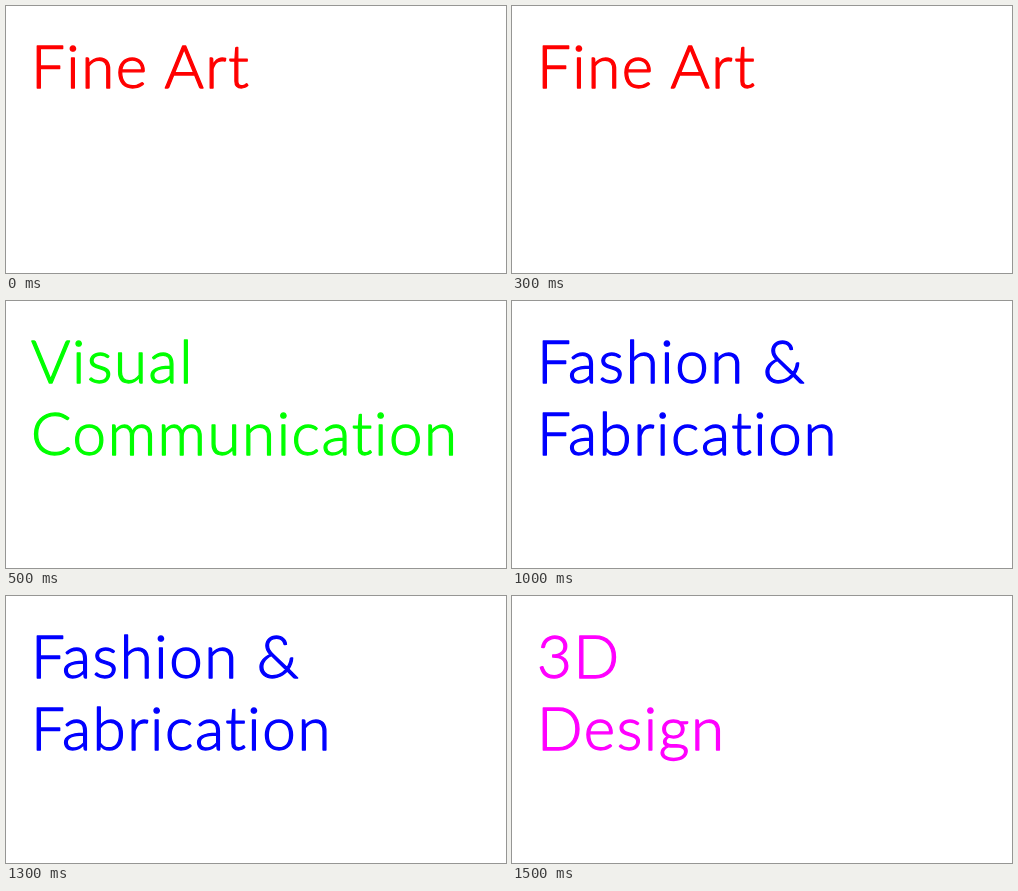
Write an HTML page that moves like this. It is 500 px wide and 267 px high and loops after 2 s.

```html
<!DOCTYPE html>
<html lang="en">
<head>
<meta charset="utf-8">
<title>Courses</title>
<style>
  html, body {
    margin: 0;
    width: 100%;
    height: 100%;
    overflow: hidden;
    background: #fff;
  }
  svg {
    display: block;
    width: 100%;
    height: 100%;
  }
  /* A thin round outline softens the stroke ends of the light face */
  text {
    font: 300 60px Lato, sans-serif;
    letter-spacing: 1.6px;
    fill: var(--ink);
    stroke: var(--ink);
    stroke-width: 1.3px;
    stroke-linejoin: round;
  }
  .slide {
    visibility: hidden;
    animation: show 2s step-end infinite;
    animation-delay: calc(var(--i) * 0.5s - 2s);
  }
  @keyframes show {
    0% { visibility: visible; }
    25%, 100% { visibility: hidden; }
  }
</style>
</head>
<body>
<svg viewBox="0 0 500 267">
  <g class="slide" style="--i: 0; --ink: #f00">
    <text x="25" y="82.3">Fine Art</text>
  </g>
  <g class="slide" style="--i: 1; --ink: #0f0">
    <text x="25" y="82.3">Visual</text>
    <text x="25" y="154.3">Communication</text>
  </g>
  <g class="slide" style="--i: 2; --ink: #00f">
    <text x="25" y="82.3">Fashion &amp;</text>
    <text x="25" y="154.3">Fabrication</text>
  </g>
  <g class="slide" style="--i: 3; --ink: #f0f">
    <text x="25" y="82.3">3D</text>
    <text x="25" y="154.3">Design</text>
  </g>
</svg>
</body>
</html>
```
